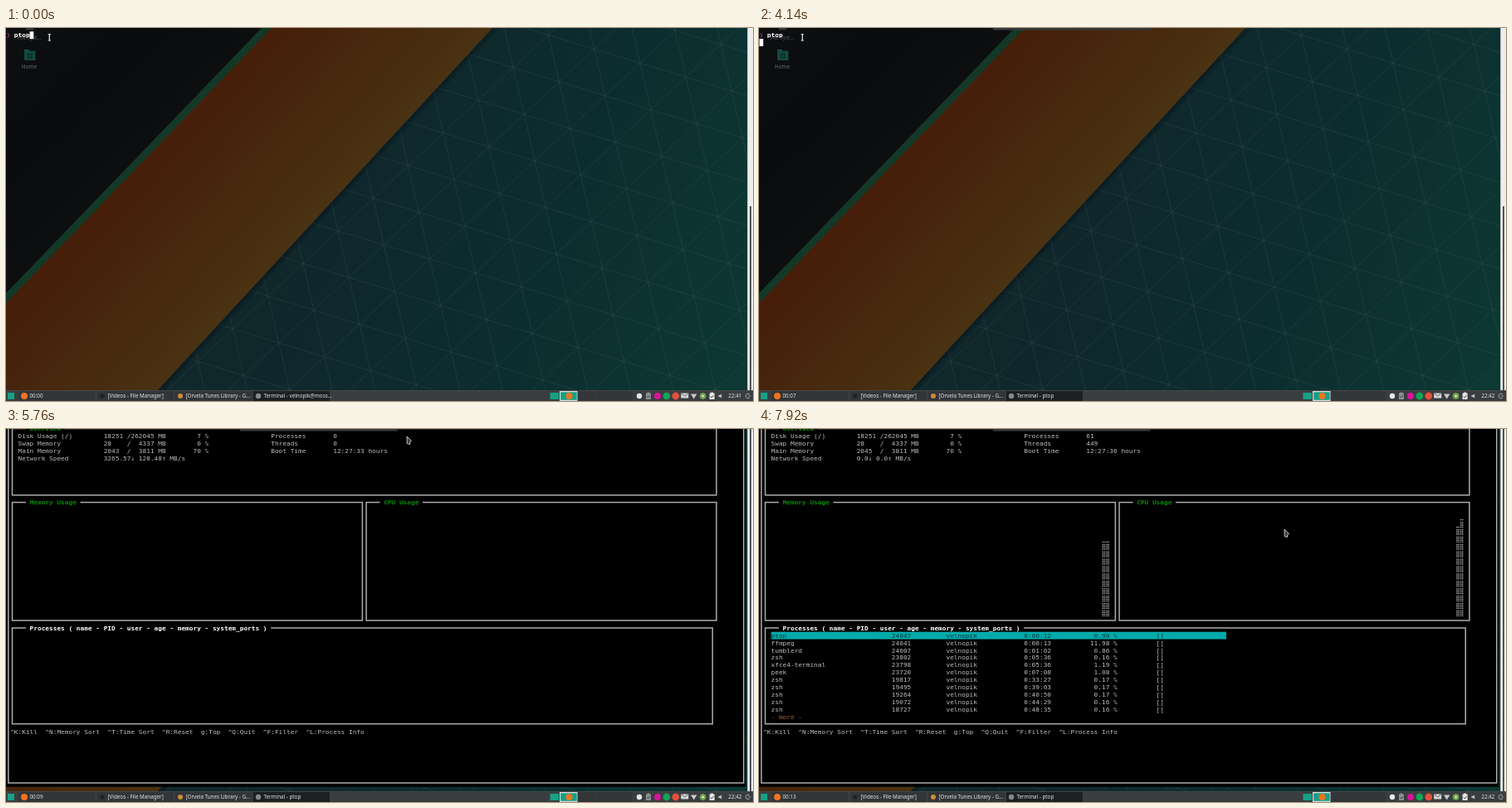
Animation, 900 px wide and 450 px high, one loop 8 s. Source, as an HTML page with a canvas:

```html
<!DOCTYPE html>
<html lang="en">
<head>
<meta charset="utf-8">
<title>Terminal process monitor</title>
<style>
  html, body { margin: 0; width: 100%; height: 100%; overflow: hidden; background: #000; }
  canvas { display: block; width: 900px; height: 450px; }
</style>
</head>
<body>
<canvas id="stage" width="900" height="450"></canvas>
<script>
const ctx = document.getElementById('stage').getContext('2d');
const LOOP = 8000, TICK = 60;
const ENTER = 660, TOAST = 3060, MINUTE = 4140, PROMPT = 5100, MONITOR = 5160;
const FIRST_SAMPLE = 5580, SAMPLE_EVERY = 780;

// Terminal grid: 10 x 19 desktop pixels per cell, scaled down to the stage.
const SCALE = 0.46875, COL = 10 * SCALE, ROW = 19 * SCALE, LEFT = SCALE, TOP = 9 * SCALE;
const colX = col => LEFT + col * COL;
const rowY = row => TOP + row * ROW;

const USER = 'velnopik', GREY = '#bcbcbc', LINE = '#acacac', GREEN = '#078a07', TEAL = '#16a085', ORANGE = '#ee7420';

// name, pid, age in seconds, memory share
const PROCESSES = `
  ptop 24047 10.8 0.89
  ffmpeg 24041 12 11.97
  tumblerd 24007 61 0.86
  zsh 23802 335 0.16
  xfce4-terminal 23798 335 1.19
  peek 23720 427 1.08
  zsh 19817 2006 0.17
  zsh 19495 2342 0.17
  zsh 19264 2449 0.17
  zsh 19072 2668 0.16
  zsh 18727 2913.8 0.16`.trim().split('\n').map(row => row.trim().split(' '));

const pad = n => String(n).padStart(2, '0');
const clock = s => `${Math.floor(s / 3600)}:${pad(Math.floor(s / 60) % 60)}:${pad(Math.floor(s) % 60)}`;

function rect(x, y, w, h, color) {
  ctx.fillStyle = color;
  ctx.fillRect(x, y, w, h);
}

function trace(points) {
  ctx.beginPath();
  points.forEach(([x, y]) => ctx.lineTo(x, y));
}

function poly(points, color) {
  trace(points);
  ctx.fillStyle = color;
  ctx.fill();
}

function line(points, color, width = 1) {
  trace(points);
  ctx.strokeStyle = color;
  ctx.lineWidth = width;
  ctx.stroke();
}

function dot(x, y, r, color) {
  ctx.beginPath();
  ctx.arc(x, y, r, 0, 7);
  ctx.fillStyle = color;
  ctx.fill();
}

function gradient(x0, y0, x1, y1, ...colors) {
  const g = ctx.createLinearGradient(x0, y0, x1, y1);
  colors.forEach((c, i) => g.addColorStop(i / (colors.length - 1), c));
  return g;
}

function text(str, x, y, font, color, align = 'left') {
  ctx.save();
  ctx.translate(x, y);
  ctx.scale(SCALE, SCALE);
  ctx.font = font;
  ctx.fillStyle = color;
  ctx.textAlign = align;
  ctx.fillText(str, 0, 0);
  ctx.restore();
}

const mono = (str, col, row, color = GREY, weight = '') =>
  text(str, colX(col), rowY(row) + 15 * SCALE, `${weight} 16.61px "DejaVu Sans Mono", monospace`, color);
const label = (str, x, y = 446.4, color = '#e4e4e4', align) =>
  text(str, x, y, '13.4px "Noto Sans", sans-serif', color, align);
const cells = (col, row, count, color) => rect(colX(col), rowY(row), count * COL, ROW, color);

// Everything above the diagonal from (top, 0) to (0, left).
const corner = (top, left, color) => poly([[0, 0], [top, 0], [0, left]], color);

function mesh() {
  for (const deg of [17, 77, 137]) {
    ctx.save();
    ctx.translate(556, 31);
    ctx.rotate(deg * Math.PI / 180);
    for (let y = -700; y <= 700; y += 50) line([[-900, y], [900, y]], 'rgba(105,125,125,.2)', 0.8);
    ctx.restore();
  }
}

function wallpaper() {
  rect(0, 0, 900, 450, gradient(370, 230, 880, 440, '#10272c', '#0c2d2f', '#0d3833'));
  mesh();
  for (let d = 9; d > 0; d -= 3) corner(586 + d, 635 + d, 'rgba(4,14,16,.13)');
  corner(586, 635, gradient(160, 166, 315, 309, '#471e09', '#45220c', '#48290e', '#482d10', '#4a3413'));
  corner(320, 332, '#143827');
  corner(308, 320, gradient(0, 0, 154, 160, '#0e0f11', '#090b0d', '#0d0e10'));

  rect(24, 0, 9, 2.5, '#34383a');
  label('File Syst...', 28, 14, '#535557', 'center');
  rect(22, 26, 6, 3, '#15544c');
  rect(22, 27.5, 13.5, 11.5, '#12483f');
  ctx.strokeStyle = '#0a2824';
  ctx.strokeRect(26.8, 31.5, 4, 4.5);
  label('Home', 28, 49.2, '#6c6e70', 'center');
}

function shell(t) {
  const question = 'A new version is available, would you like to update (Y/N) ? ';
  mono('❯', 0, 0, '#8e2a8e', 'bold');
  mono('ptop', 2, 0, '#fff', 'bold');
  if (t >= PROMPT) mono(question, 0, 1, '#0808c8', 'bold');
  if (t < ENTER) cells(6, 0, 1, '#fff');
  else cells(t < PROMPT ? 0 : question.length, 1, 1, '#fff');
}

// Box drawn through cell centres; a title interrupts its top line.
function panel(col, row, lastCol, lastRow, title = '', color) {
  const [x, right] = [col, lastCol].map(c => colX(c + 0.5));
  const [y, bottom] = [row, lastRow].map(r => rowY(r + 0.47));
  line([[colX(col + 4), y], [x, y], [x, bottom], [right, bottom], [right, y], [colX(col + 6 + title.length), y]], LINE, 1.5);
  mono(title, col + 5, row, color, 'bold');
}

// Column of braille cells, four dot rows each, with one dot row in the top cell.
function bar(col, topRow) {
  for (let row = topRow; row <= 24; row++) {
    for (let i = row === topRow ? 3 : 0; i < 4; i++) {
      for (const dx of [0.6, 2.7]) rect(colX(col) + dx, rowY(row) + 0.9 + i * 1.95, 1.5, 1.2, '#a8a8a8');
    }
  }
}

function overview(sample) {
  const speed = ['3265.57↓ 128.48↑', '0.06↓ 0.0↑', '0.0↓ 0.0↑'][Math.max(0, sample - 1)];
  [
    `Disk Usage (/)        18251 /262045 MB        7 %                Processes       ${sample < 1 ? 0 : 61}`,
    `Swap Memory           28    /  4337 MB        0 %                Threads         ${sample < 2 ? 0 : 449}`,
    `Main Memory           ${sample < 1 ? 2043 : 2045}  /  3811 MB       70 %                Boot Time       12:27:${33 + sample} hours`,
    `Network Speed         ${speed} MB/s`
  ].forEach((str, row) => mono(str, 3, row));
}

function processes(sample) {
  const steps = Math.max(0, sample - 2);
  cells(3, 27, 117, '#00aaaa');
  PROCESSES.forEach(([name, pid, age, share], i) => {
    const memory = (+share + (i < 2 ? steps / 100 : 0)).toFixed(2);
    const str = name.padEnd(31) + pid.padEnd(14) + USER.padEnd(20) +
      clock(+age + steps * 1.3).padEnd(17) + memory.padStart(5) + ' %' + '[]'.padStart(12);
    mono(str, 3, 27 + i, i ? GREY : '#06383a');
  });
  mono('- more -', 3, 38, '#b06018');
}

function monitor(t) {
  const sample = Math.floor((t - FIRST_SAMPLE) / SAMPLE_EVERY);
  rect(0, 0, colX(190), rowY(48), '#000');
  panel(0, -2, 189, 47);
  panel(1, -1, 182, 8, 'Overview', GREEN);
  panel(1, 9, 91, 25, 'Memory Usage', GREEN);
  panel(92, 9, 182, 25, 'CPU Usage', GREEN);
  panel(1, 26, 181, 39, 'Processes ( name - PID - user - age - memory - system_ports )', '#fff');
  mono('^K:Kill  ^N:Memory Sort  ^T:Time Sort  ^R:Reset  g:Top  ^Q:Quit  ^F:Filter  ^L:Process Info', 1, 40);
  if (sample >= 0) overview(sample);
  if (sample >= 1) processes(sample);
  for (let s = 2; s <= sample; s++) {
    bar(89 - sample + s, 14);
    bar(180 - sample + s, 14 - s);
  }
}

function scrollbar(t) {
  const top = t < MONITOR ? 215 : 0;
  rect(893.3, 0, 6.7, 437, '#ededed');
  rect(896, top, 2, 437 - top, '#505254');
}

// Recording timer: uneven while the shell is busy, then steady.
function recorded(t) {
  if (t >= MINUTE) return 7 + Math.floor((t - MINUTE) / 600);
  return [ENTER, 900, 1500, TOAST, 3240, 3900].filter(tick => t >= tick).length;
}

function taskbar(t) {
  rect(0, 437, 900, 13, '#3a3d3f');
  rect(0, 437, 900, 0.7, '#4a4d4f');
  rect(2, 440, 8, 8, TEAL);

  const buttons = [
    ['00:' + pad(recorded(t)), ORANGE, 4],
    ['[Videos - File Manager]', '#202325', 2.8],
    ['[Orvela Tunes Library - G...', '#cf8a3c', 3],
    [t < ENTER ? `Terminal - ${USER}@moss...` : 'Terminal - ptop', '#85888a', 3.2]
  ];
  buttons.forEach(([title, color, size], i) => {
    const x = 15.5 + 94 * i;
    rect(x, 438, 93, 12, i === 3 ? '#1d1f21' : '#323537');
    rect(x + 93, 438, 0.7, 12, '#4a4d4f');
    dot(x + 6.5, 444, size, color);
    label(title, x + 13);
  });

  rect(655.5, 440, 10.5, 8, TEAL);
  for (let i = 0; i < 4; i++) rect(667 + 22 * i, 438, 21.5, 12, i ? '#333638' : '#d9dcdc');
  rect(668.2, 439.3, 19.5, 9.5, TEAL);
  dot(678.5, 444, 4, ORANGE);
  tray();
  label(t < MINUTE ? '22:41' : '22:42', 870.3);
}

function tray() {
  const disc = (color, r) => x => dot(x, 444, r, color);
  const clipboard = color => x => {
    rect(x - 3, 440.5, 6, 7.5, color);
    rect(x - 1.3, 439.5, 2.6, 2, color);
    line([[x - 1.8, 444.3], [x - 0.4, 446], [x + 2, 443]], '#3a3d3f', 0.9);
  };
  const envelope = x => {
    rect(x - 4.5, 440.5, 9, 6, '#d5d8d8');
    line([[x - 4, 441], [x, 444], [x + 4, 441]], '#444', 0.8);
  };
  const wifi = x => poly([[x - 3.7, 441.5], [x + 3.7, 441.5], [x, 447.5]], '#c8cbcb');
  const gear = x => {
    for (let a = 0; a < 6; a += Math.PI / 4) dot(x + 3.5 * Math.cos(a), 444 + 3.5 * Math.sin(a), 0.8, '#74a952');
    dot(x, 444, 3.4, '#74a952');
    dot(x, 444, 1.2, '#e5efdf');
  };
  const speaker = x => {
    rect(x - 3, 442.8, 2, 2.4, '#c8cbcb');
    poly([[x - 2, 444], [x + 0.6, 441.2], [x + 0.6, 446.8]], '#c8cbcb');
  };
  const exit = x => {
    ctx.beginPath();
    ctx.arc(x, 444, 2.8, 0.8, 5.5);
    ctx.strokeStyle = '#b0b3b3';
    ctx.stroke();
    line([[x, 444], [x + 3.5, 444]], '#b0b3b3', 0.8);
  };
  [disc('#e8e8e8', 3.2), clipboard('#8d9092'), disc('#d8149c', 4), disc('#12a558', 4.4), disc('#e2503b', 4.4),
    envelope, wifi, gear, clipboard('#e8e8e8'), speaker].forEach((icon, i) => icon(763 + 10.95 * i));
  exit(894);
}

// Rests at each stop and eases to the next: start, end, position.
function mousePosition(t) {
  const moves = [[5340, 5760, 483, 9], [5820, 6840, 256, 89], [7260, 7920, 633, 121]];
  return moves.reduce(([x, y], [start, end, toX, toY]) => {
    const p = Math.min(1, Math.max(0, (t - start) / (end - start)));
    const e = p * p * (3 - 2 * p);
    return [x + (toX - x) * e, y + (toY - y) * e];
  }, [52, 11]);
}

function pointer(t) {
  const [x, y] = mousePosition(t);
  if (t < PROMPT) {
    line([[x + 0.3, 7.5], [x + 0.3, 15]], '#f2f2f2', 1.2);
    for (const end of [7.2, 14.6]) rect(x - 1.4, end, 3.4, 0.9, '#f2f2f2');
    return;
  }
  const arrow = [[0, 0], [5.4, 5.6], [3.7, 6.6], [3.5, 9.4], [0.3, 8.6], [0, 0]].map(([dx, dy]) => [x + dx, y + dy]);
  poly(arrow, '#3a3a3a');
  line(arrow, '#d8d8d8', 0.9);
}

function draw(now) {
  const t = Math.floor((now % LOOP) / TICK) * TICK;
  wallpaper();
  if (t < MONITOR) shell(t);
  else monitor(t);
  scrollbar(t);
  if (t >= TOAST) rect(281.8, 0, 189.7, 2.6, '#35383a');
  taskbar(t);
  pointer(t);
}

const start = performance.now();
function frame() {
  draw(performance.now() - start);
  requestAnimationFrame(frame);
}
frame();
</script>
</body>
</html>
```
